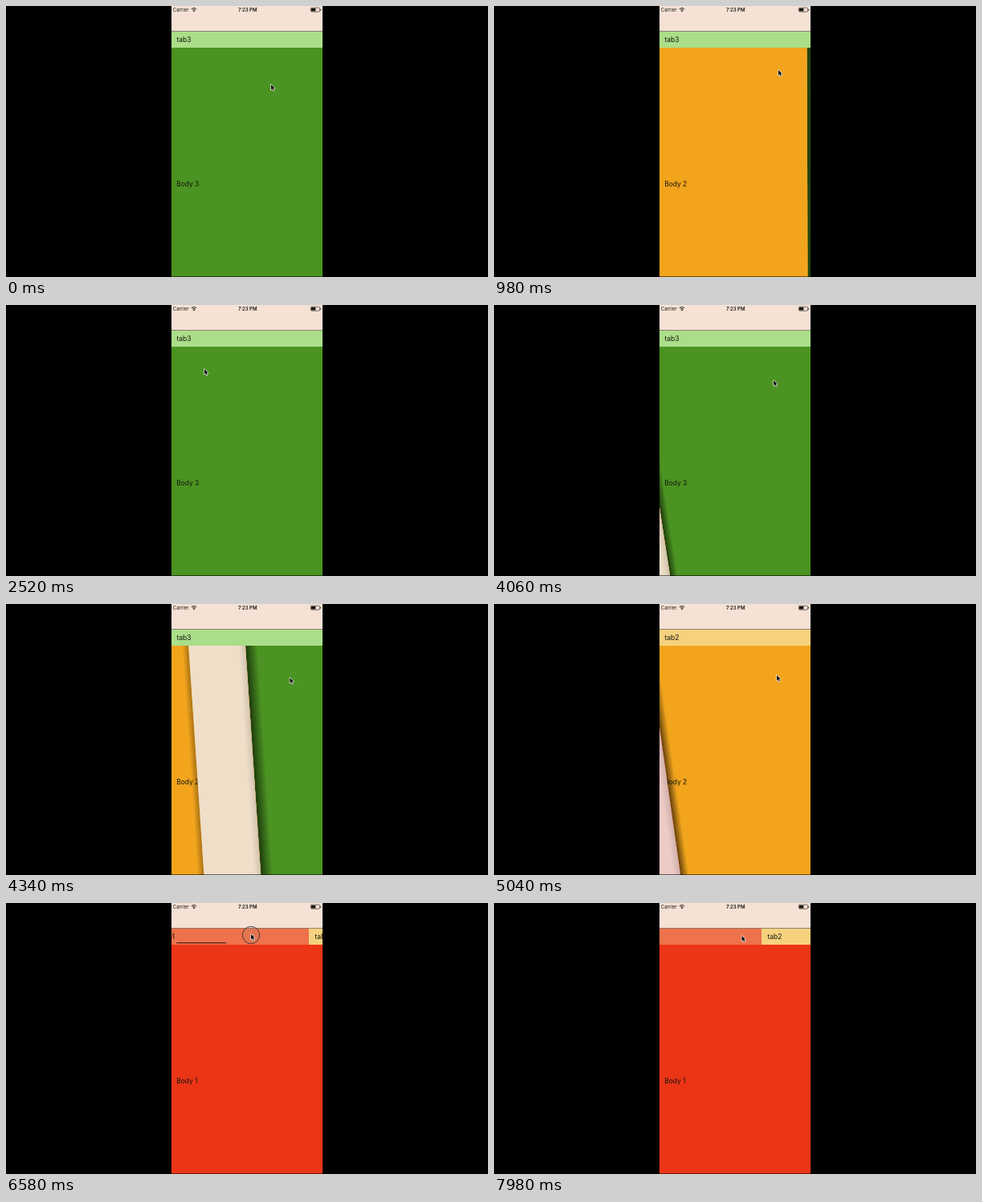
An HTML page with a canvas that plays this animation: 600 px wide and 338 px high, repeating every 8 s.

```html
<!DOCTYPE html>
<html lang="en">
<head>
<meta charset="utf-8">
<title>Page curl tabs</title>
<style>
html, body { margin: 0; width: 100%; height: 100%; overflow: hidden; background: #000; }
canvas { display: block; width: 600px; height: 338px; }
</style>
</head>
<body>
<canvas id="stage" width="600" height="338"></canvas>
<script>
const ctx = document.getElementById('stage').getContext('2d');
const LOOP = 8000, STEP = 140;
const L = 206, R = 394, W = R - L, BAR = 31.5, TOP = 52, H = 338;
const FONT = 'Inter, Roboto, sans-serif';
const INK = '#14160f';

const pages = [
  { name: '1', body: '#ec3517', tab: '#ee724b', back: '#edcac4', x: 0, pad: 5, rest: 0 },
  { name: '2', body: '#f2a41d', tab: '#f6d27e', back: '#efdfc9', x: 188, pad: 7.5, rest: 189 },
  { name: '3', body: '#4b9322', tab: '#abde89', back: '#d5e3cb', x: 377, pad: 7.5, rest: 378 }
];

// Page turns: start time and page indices
const TURN = 700, SLIDE = 300;
const turns = [
  { at: 337, from: 2, to: 1 },
  { at: 1500, from: 1, to: 2 },
  { at: 3947, from: 2, to: 1 },
  { at: 4876, from: 1, to: 0 }
];

// Pointer keys: time, x, y
const pointer = [
  [0, 330, 98], [280, 325, 92], [700, 350, 81], [980, 354, 80], [1400, 354, 80],
  [1820, 262, 79], [2520, 247, 80], [2900, 247, 81], [3640, 326, 97], [4060, 348, 94],
  [4480, 356, 91], [4760, 332, 92], [5040, 352, 89], [5460, 362, 84],
  [6160, 322, 41], [6440, 322, 39], [6580, 305, 39], [6720, 270, 39],
  [6860, 261, 39], [7140, 262, 40], [7840, 308, 41], [8000, 308.5, 41]
];
const drag = [[6440, 0], [6580, 17], [6720, 52], [6860, 61]];

const clamp = v => Math.max(0, Math.min(1, v));
const ease = v => { v = clamp(v); return v * v * (3 - 2 * v); };

function track(keys, t, col) {
  if (t <= keys[0][0]) return keys[0][col];
  for (let i = 1; i < keys.length; i++) {
    const a = keys[i - 1], b = keys[i];
    if (t <= b[0]) return a[col] + (b[col] - a[col]) * (t - a[0]) / (b[0] - a[0]);
  }
  return keys[keys.length - 1][col];
}

function rect(x, y, w, h, fill) {
  ctx.fillStyle = fill;
  ctx.fillRect(x, y, w, h);
}

function text(s, x, y, size, weight = 400, align = 'left') {
  ctx.font = `${weight} ${size}px ${FONT}`;
  ctx.textAlign = align;
  ctx.fillStyle = INK;
  ctx.fillText(s, x, y);
}

function clipped(x, y, w, h, draw) {
  ctx.save();
  ctx.beginPath();
  ctx.rect(x, y, w, h);
  ctx.clip();
  draw();
  ctx.restore();
}

function body(page) {
  rect(L, TOP, W, H - TOP, page.body);
  text('Body ' + page.name, 212.3, 225, 8.4);
}

// Slanted band between two offsets from the fold line
function band(fold, slope, from, to, fill) {
  const top = fold - slope * (H - TOP);
  ctx.beginPath();
  ctx.moveTo(top + from, TOP);
  ctx.lineTo(top + to, TOP);
  ctx.lineTo(fold + to, H);
  ctx.lineTo(fold + from, H);
  ctx.fillStyle = fill;
  ctx.fill();
}

function fade(fold, slope, from, to, a, b) {
  // Gradient axis is perpendicular to the fold
  const k = 1 / (1 + slope * slope);
  const g = ctx.createLinearGradient(
    fold + from * k, H - from * k * slope, fold + to * k, H - to * k * slope);
  g.addColorStop(0, `rgba(0,0,0,${a})`);
  g.addColorStop(1, `rgba(0,0,0,${b})`);
  band(fold, slope, from, to, g);
}

// upper lies flat at p = 1 and is rolled off to the left at p = 0
function curl(upper, lower, p) {
  body(lower);
  const fold = L + W * p, slope = 0.165 * (1 - p);
  const flap = Math.max(0, W * (1 - p) - 6);
  const reach = 9 + 10 * p;
  fade(fold, slope, 0, reach, 0.6, 0);
  ctx.save();
  band(fold, slope, -500, 0, upper.body);
  ctx.clip();
  body(upper);
  ctx.restore();
  if (flap > 0) {
    fade(fold, slope, -flap - 8, -flap, 0, 0.3);
    band(fold, slope, -flap, 0, upper.back);
    fade(fold, slope, -Math.min(flap, 9), 0, 0, 0.12);
  }
}

function drawBody(t) {
  let current = 2;
  for (const { at, from, to } of turns) {
    if (t < at) break;
    if (t < at + TURN) {
      const p = ease((t - at) / TURN);
      if (to < from) curl(pages[to], pages[from], p);
      else curl(pages[from], pages[to], 1 - p);
      return;
    }
    current = to;
  }
  body(pages[current]);
}

function drawTabs(t) {
  let off = pages[2].rest;
  for (const { at, from, to } of turns) {
    const k = ease((t - at - TURN) / SLIDE);
    if (k > 0) off = pages[from].rest + (pages[to].rest - pages[from].rest) * k;
  }
  off += track(drag, t, 1);
  for (const page of pages) {
    const x = L + page.x - off;
    rect(x, BAR, 190, TOP - BAR, page.tab);
    text('tab' + page.name, x + page.pad, 45, 8.5);
  }
  const shown = t > 6440 ? 1 - clamp((t - 6900) / 350) : 0;
  if (shown) rect(L + 0.5 + off / 3, 49, 62, 1.4, `rgba(40,20,12,${0.75 * shown})`);
}

function drawStatus() {
  rect(L, 0, W, BAR, '#f6e1d5');
  rect(L, BAR - 0.5, W, 0.5, 'rgba(90,80,60,.35)');
  text('Carrier', 207.8, 7, 6);
  text('7:23 PM', 300.7, 7, 6, 600, 'center');

  ctx.strokeStyle = INK;
  ctx.lineWidth = 1;
  for (const r of [2.3, 4.2]) {
    ctx.beginPath();
    ctx.arc(234, 6.8, r, -Math.PI * 0.77, -Math.PI * 0.23);
    ctx.stroke();
  }
  ctx.beginPath();
  ctx.arc(234, 6.3, 0.9, 0, 7);
  ctx.fillStyle = INK;
  ctx.fill();

  ctx.lineWidth = 0.6;
  ctx.beginPath();
  ctx.roundRect(379.3, 2.2, 11.2, 5, 1.2);
  ctx.stroke();
  rect(380, 2.9, 5.4, 3.6, INK);
  rect(391, 3.9, 0.8, 1.7, INK);
}

function drawPointer(t) {
  const x = track(pointer, t, 1), y = track(pointer, t, 2);
  if (t >= 6440 && t < 6900) {
    ctx.beginPath();
    ctx.arc(x, y + 1, 10.7, 0, 7);
    ctx.fillStyle = 'rgba(150,140,130,.12)';
    ctx.fill();
    ctx.strokeStyle = 'rgba(50,45,45,.85)';
    ctx.lineWidth = 1;
    ctx.stroke();
  }
  const shape = [[0, 0], [0, 6.4], [1.5, 5.1], [2.6, 7.6], [3.8, 7.1], [2.7, 4.7], [4.7, 4.6]];
  ctx.beginPath();
  for (const [dx, dy] of shape) ctx.lineTo(x + dx, y + dy);
  ctx.closePath();
  ctx.lineJoin = 'round';
  ctx.lineWidth = 1.3;
  ctx.strokeStyle = '#f4f4f0';
  ctx.stroke();
  ctx.fillStyle = '#080808';
  ctx.fill();
}

function draw(t) {
  rect(0, 0, 600, H, '#000');
  clipped(L, TOP, W, H - TOP, () => drawBody(t));
  clipped(L, BAR, W, TOP - BAR, () => drawTabs(t));
  drawStatus();
  rect(L, 337, W, 1, 'rgba(0,0,0,.55)');
  drawPointer(t);
}

const start = performance.now();
function tick() {
  const t = (performance.now() - start) % LOOP;
  draw(Math.floor(t / STEP) * STEP);
  requestAnimationFrame(tick);
}
tick();
</script>
</body>
</html>
```
